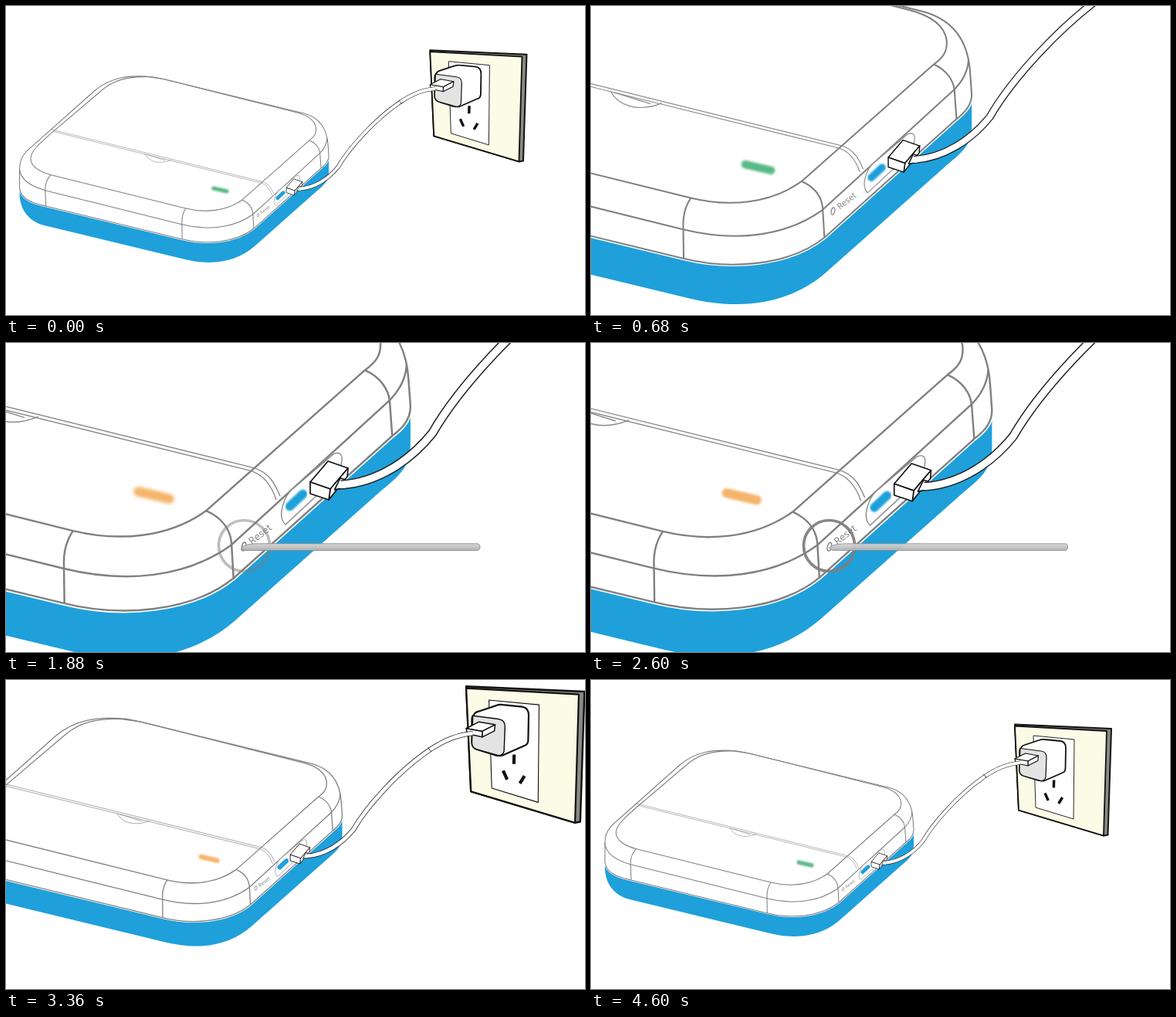
An HTML page that plays this animation: 750x400 px, repeating every 4640 ms.

```html
<!DOCTYPE html>
<html lang="en">
<head>
<meta charset="utf-8">
<title>Reset guide</title>
<style>
  html, body { margin: 0; width: 100%; height: 100%; overflow: hidden; background: #fff; }
  svg { display: block; width: 750px; height: 400px; }
  .line { fill: none; stroke: #808080; stroke-width: 1.05; stroke-linejoin: round; }
  .thin { fill: none; stroke: #8a8a8a; stroke-width: .6; }
  .ink { stroke: #111; stroke-linejoin: round; }
  text { font: 13px "Noto Sans", "Open Sans", sans-serif; fill: #858585; }
</style>
</head>
<body>
<svg viewBox="0 0 750 400">
  <defs>
    <filter id="soft" x="-30%" y="-80%" width="160%" height="260%"><feGaussianBlur stdDeviation="1"/></filter>
    <filter id="glow" x="-30%" y="-150%" width="160%" height="400%"><feGaussianBlur stdDeviation="1.9"/></filter>
    <linearGradient id="steel" x1="0" y1="0" x2="0" y2="1">
      <stop offset="0" stop-color="#d8d8d8"/><stop offset="1" stop-color="#b0b0b0"/>
    </linearGradient>
    <path id="shell" d="M18 236V211C18 198 24 190 34 182L115 110C135 93 158 89 190 92L205 95L385 139C409 145 416 162 417 180L418 194C418 202 412 207 408 210L321 288C298 306.5 259 309.5 228 301.7L52 259C34 255 20 250 18 236Z"/>
    <path id="cord" d="M380 236.8C400 235.5 418 223.5 430 208.5C443.5 185 476.3 147.6 511 124.2C528 113 540 109 556 107"/>
  </defs>

  <g id="scene">
    <!-- wall socket -->
    <g class="ink">
      <path d="M549 57.5L674 63L669.5 200.5L664 201.5L554 168.5Z" fill="#8b8b85" stroke-width="2"/>
      <path d="M549 59.5L668 66L664 201.5L554 168.5Z" fill="#fbfbe6" stroke-width="1.8"/>
      <path d="M573 72L626 77L625 180L576 165Z" fill="#fff" stroke-width=".9"/>
      <path d="M599.7 129.5L599.4 139.5M588 146.5L592.3 156M610.6 152L605.7 160" fill="none" stroke-width="3.4"/>
      <path d="M557 88Q558 85 562 84L580 78Q584 76.5 588 77L608 79Q615 80 615 88L614.5 115Q614 119 611 120L587 130.5Q583 131 579 130L560 124Q555 122 555 117V93Q555 89 557 88Z" fill="#fff" stroke-width="1.8"/>
      <path d="M556 88.5L583 92Q590 93 590 100L589 126Q588 130.5 583 130.5L560 124Q555 122 555 117Z" fill="#e3e3e3" stroke-width="1.2"/>
      <g fill="#fff" stroke-width="1.2">
        <path d="M549 102L562.5 95L579.5 98L566 105Z"/>
        <path d="M566 105L579.5 98L578.8 104.5L566 111Z"/>
        <path d="M549 102L566 105V111L550 107.5Z"/>
      </g>
    </g>

    <!-- device -->
    <path fill="#1fa0da" d="M18 234V244C19 268 34 280 50 284L232 328C270 337 300 330 322 311L402 240C414 230 418 226 418 214V194L320 280Z"/>
    <use href="#shell" fill="#fff" stroke="#fff" stroke-width="2.4"/>
    <use href="#shell" class="line"/>
    <path class="line" d="M60 164L126 108C140 96 158 91 185 92L205 95L376 138C392 142 400 149 401.5 158C402 165 400 169 393 174L306 251C285 266 258 268 233 262L60 219C40 214 30 205 33 194C35 186 45 177 60 164Z"/>
    <path class="line" d="M18 211C19 226 34 234 52 239L228 282.7C262 291 295 287.5 319.5 270L406.6 190.5C412 185 415.5 178 415.9 171"/>
    <path class="line" d="M233 262C229 268 228 274 228 279L228.3 301.7M306 251C315 255 320 262 320 271L321 288M393 174C402 178 406 185 406.6 191L408 210M58 219C52 226 51 234 51.3 239L52 259"/>
    <path class="thin" d="M58 159.7L331.7 227.4C341 230 344 237 346.5 243M60 162.2L329.6 228.9C338 231 342 238 344.4 245"/>
    <path class="thin" d="M180 191.5C185 201 198 206 214 199.5M182.5 192.5L206.5 200"/>

    <!-- port side, laid out at close-up size -->
    <g transform="translate(196.3 159.1) scale(.4232)">
      <path d="M362 235Q354 228 358 212Q362 197 370 190L424 144Q436 139 435 152L432 170Z" fill="#fff" stroke="#8a8a8a" stroke-width="1.4"/>
      <path d="M367.5 211.5L384.5 195.5" stroke="#1fa0da" stroke-width="11.5" stroke-linecap="round" filter="url(#soft)"/>
      <ellipse cx="308" cy="263.5" rx="2.6" ry="5.6" transform="rotate(14 308 263.5)" fill="none" stroke="#808080" stroke-width="1.4"/>
      <text transform="translate(318.5 261.5) rotate(-38)">Reset</text>
      <g class="ink" fill="#fff" stroke-width="1.7">
        <path d="M394 180L417 153L443 162L420 189Z"/>
        <path d="M420 189L443 162L442 173L418 203Z"/>
        <path d="M394 180L420 189L418 203L394 195Z"/>
        <path d="M440 177L433 175L425.5 190L437 188"/>
      </g>
    </g>

    <!-- cable -->
    <use href="#cord" fill="none" stroke="#222" stroke-width="5.2"/>
    <use href="#cord" fill="none" stroke="#fff" stroke-width="3.9"/>
    <path d="M379 236.8H382" stroke="#fff" stroke-width="3.7"/>
    <path d="M508.6 122.3L512.3 126.7" stroke="#222" stroke-width=".8"/>
  </g>

  <g id="led" fill="none" stroke-width="12.5" stroke-linecap="round">
    <g filter="url(#glow)">
      <path id="green" d="M-20 -4.6L20 4.6" stroke="#58b987"/>
      <path id="amber" d="M-20 -4.6L20 4.6" stroke="#f4b164"/>
    </g>
  </g>
  <circle id="ring" cx="308.5" cy="262.5" r="33" fill="none" stroke="#7f7f7f" stroke-width="3.7"/>
  <g id="pin">
    <path d="M0 265Q2 261 18 259.8H305Q309 259.8 309 264Q309 268.5 305 268.5H6Q1 268.5 0 265Z" fill="url(#steel)" stroke="#8c8c8c" stroke-width=".9"/>
  </g>
</svg>
<script>
const LOOP = 4640;
const ZOOM = { s: 1.363, x: -463.8, y: -376 };

// [time, value] steps, linear in between
const tracks = {
  zoom:  [[0, 0], [960, 1], [2560, 1], [3520, 0]],
  pinX:  [[960, 402], [1680, 305], [2560, 305], [3280, 368]],
  pin:   [[960, 0], [1160, 1], [2560, 1], [3280, 0]],
  ring:  [[960, 0], [1040, 1], [1680, 1], [1880, .5], [2160, .5], [2480, 1], [2560, 1], [3280, 0]],
  amber: [[1680, 0], [1840, 1], [4440, 1], [4600, 0]]
};

function at(name, t) {
  const k = tracks[name];
  if (t <= k[0][0]) return k[0][1];
  for (let i = 1; i < k.length; i++) {
    const [t0, a] = k[i - 1], [t1, b] = k[i];
    if (t <= t1) return a + (b - a) * (t - t0) / (t1 - t0);
  }
  return k[k.length - 1][1];
}

const el = id => document.getElementById(id);
const [scene, led, green, amber, ring, pin] =
  ["scene", "led", "green", "amber", "ring", "pin"].map(el);
const move = (node, x, y, s = 1) =>
  node.setAttribute("transform", `translate(${x} ${y}) scale(${s})`);
const fade = (node, v) => node.setAttribute("opacity", v);

function draw(t) {
  const p = at("zoom", t);
  const s = 1 + ZOOM.s * p;
  move(scene, ZOOM.x * p, ZOOM.y * p, s);
  move(led, 277.5 - 86 * p, 238 - 41 * p, s / 2.363);

  const mix = at("amber", t);
  const pulse = .72 + .24 * Math.cos(2 * Math.PI * (t - 1880) / 760);
  fade(green, 1 - mix);
  fade(amber, mix * pulse);

  fade(ring, at("ring", t));
  move(pin, at("pinX", t), 0);
  fade(pin, at("pin", t));
}

const start = performance.now();
function tick() {
  draw((performance.now() - start) % LOOP);
  requestAnimationFrame(tick);
}
draw(0);
requestAnimationFrame(tick);
</script>
</body>
</html>
```
